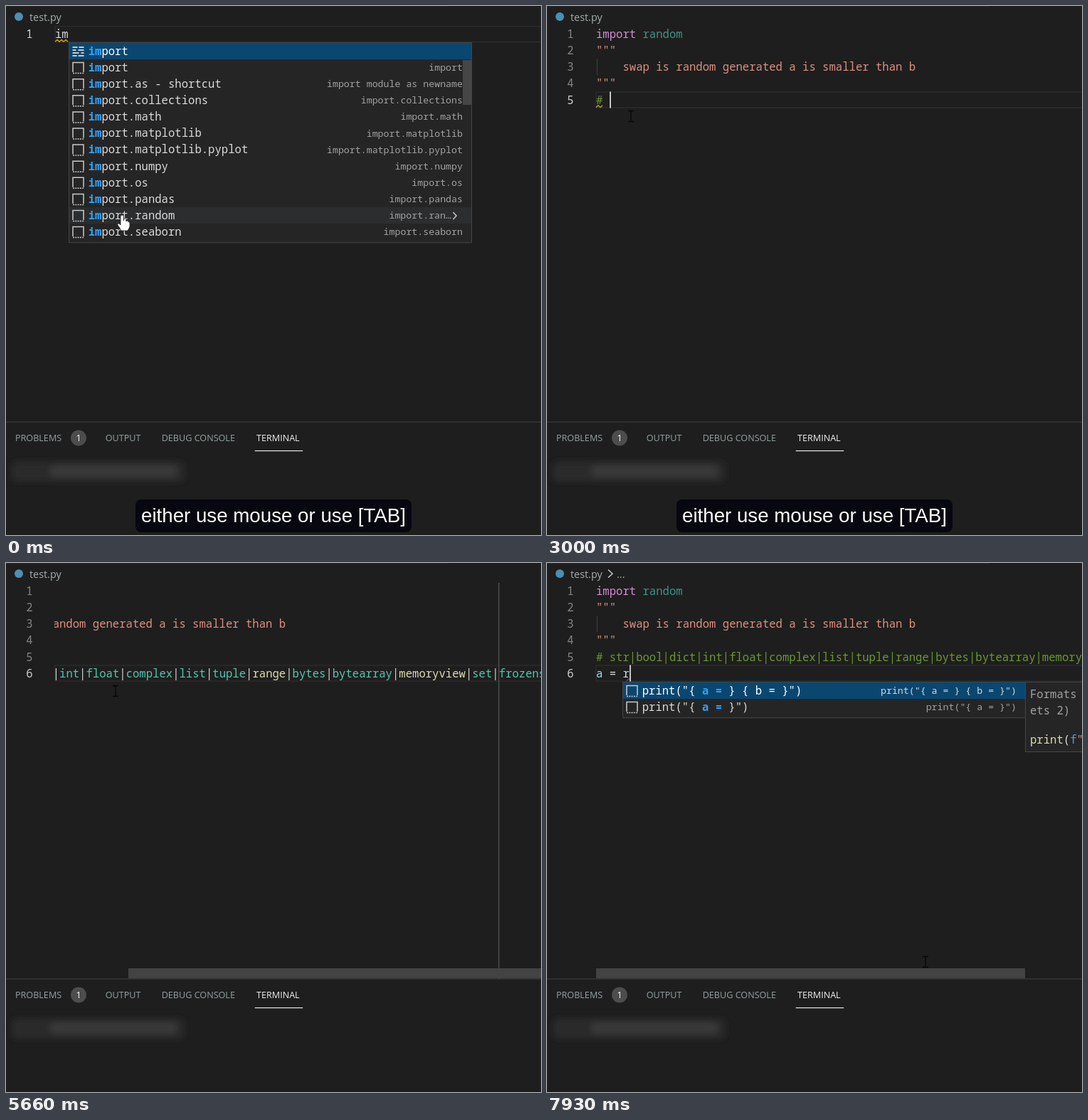
An HTML page for the animation above (8000 ms loop, 752 by 744 pixels).

```html
<!DOCTYPE html>
<html lang="en">
<head>
<meta charset="utf-8">
<title>Editor completion demo</title>
<style>
html, body { margin: 0; width: 752px; height: 744px; overflow: hidden; background: #1e1e1e; }
svg { display: block; }
text { white-space: pre; font: 15.6px "Noto Sans Mono", monospace; fill: #dadada; }
text.ui { font: 12.6px "Open Sans", sans-serif; fill: #95a0a2; }
text.file { font-size: 14.4px; fill: #a8aeae; }
text.num { text-anchor: end; fill: #858585; }
text.det { font-size: 13.28px; text-anchor: end; fill: #a2a2a2; }
text.on { fill: #fff; font-weight: 500; }
text.det.on { fill: #d3dbe2; font-weight: 400; }
text.info { fill: #a2a2a2; }
text.cap { font: 27.7px "Liberation Sans", sans-serif; fill: #fff; }
.m { fill: #2aa5ff; font-weight: 700; }
.ico { fill: none; stroke: #c9c9c9; stroke-width: 1.5; }
</style>
</head>
<body>
<svg width="752" height="744" viewBox="0 0 752 744">
  <defs>
    <clipPath id="area"><rect x="68" y="28" width="684" height="557"/></clipPath>
    <filter id="blur" x="-20%" y="-60%" width="140%" height="220%"><feGaussianBlur stdDeviation="4.5"/></filter>
    <g id="k" class="ico" style="stroke-width:1.9"><path d="M-8-6H-1M1-6H8M-8-2H-3M0-2H8M-8 2H1M4 2H8M-8 6H-2M0 6H8"/></g>
    <g id="s" class="ico"><path d="M-7.5 6V-7.5H7.5V6"/><path d="M-7.5 7.5H8" stroke-dasharray="2 1.3"/></g>
    <g id="m" class="ico" style="stroke:#b180d7"><path d="M0-8L7-4V4L0 8L-7 4V-4ZM-7-4L0 0L7-4M0 0V8"/></g>
    <g id="c" class="ico" style="stroke:#ee9d28"><path d="M-8-3L-4-7L0-3L-4 1ZM-2-1H4M1-1V5H4M4-1L6-3L8-1L6 1ZM4 5L6 3L8 5L6 7Z"/></g>
    <g id="v" class="ico" style="stroke:#75beff"><path d="M-5-5H-8V5H-5M5-5H8V5H5M-4 1L1-3L4-1V1L-1 4L-4 2ZM-4 1L-1 2L4-1M-1 2V4"/></g>
  </defs>
  <rect width="752" height="744" fill="#1e1e1e"/>
  <path d="M0 .5H622" stroke="#2c2c2c"/>
  <circle cx="18" cy="15" r="6" fill="#4a90b2"/>
  <text class="ui file" x="33" y="20.5">test.py</text>
  <g id="view"></g>
  <path d="M0 585H752" stroke="#434343"/>
  <g id="panel"></g>
  <g filter="url(#blur)">
    <rect x="8" y="641" width="242" height="28" rx="6" fill="#2a2a2a"/>
    <rect x="62" y="645" width="178" height="18" rx="8" fill="#393939"/>
  </g>
  <g id="caption">
    <rect x="182" y="694" width="388" height="46" rx="8" fill="#07070f"/>
    <text class="cap" x="190" y="726">either use mouse or use [TAB]</text>
  </g>
  <g id="mouse">
    <path id="hand" d="M0 0C2 0 2.4 1 2.4 3V8C4-1 6 7 6 9C7 7 9 8 9 10C10 9 11 10 11 12V16Q10 19 8 22H-1Q-3 18-6 14C-7 12-4 11-2 14V2Q-2 0 0 0Z" fill="#fff" stroke="#222" stroke-width=".8"/>
    <path id="beam" d="M-4-7.5H-1L0-6.5L1-7.5H4M0-6.5V6.5M-4 7.5H-1L0 6.5L1 7.5H4" fill="none" stroke="#080808" stroke-width="1.3"/>
  </g>
</svg>
<script>
const LOOP = 8000, X0 = 69, CW = 9.36, LH = 23.1, TOP = 28, POP_W = 567;
const $ = id => document.getElementById(id);
const span = (fill, s) => `<tspan fill="${fill}">${s}</tspan>`;
const rect = (x, y, w, h, fill, extra = '') =>
  `<rect x="${x}" y="${y}" width="${w}" height="${h}" fill="${fill}" ${extra}/>`;
const text = (x, y, s, cls = '') => `<text x="${x}" y="${y}" class="${cls}">${s}</text>`;

// ---- document content
const types = 'str|bool|dict|int|float|complex|list|tuple|range|bytes|bytearray|memoryview|set|frozenset';
const typed = types.split(/(\|)/).map(w =>
  span(w === '|' ? '#dadada' : /range|memoryview/.test(w) ? '#dcdcaa' : '#4ec9b0', w)).join('');
const green = s => span('#6a9a2c', s);
const salmon = s => span('#de907e', s);
const imp = span('#d48ad6', 'import') + span('#3c9586', ' random');
const quote = salmon('"""');
const doc = [imp, quote, salmon('    swap is random generated a is smaller than b'), quote];
const noted = [...doc, green('# ' + types)];

// ---- suggestion rows: icon, label (~ marks a matched letter), detail
const same = (...names) => names.map(n => `s ~i~mport.${n};import.${n}`);
const prints = mark => [
  `s print("{ ${mark} } { b = }");print("{ a = } { b = }")`,
  `s print("{ ${mark} }");print("{ a = }")`];
const rows = {
  im: ['k ~i~mport', 's ~i~mport;import', 's ~i~mport.as - shortcut;import module as newname',
    ...same('collections', 'math', 'matplotlib', 'matplotlib.pyplot', 'numpy', 'os', 'pandas', 'random', 'seaborn')],
  d: ['k ~def', 'k ~del', 'm ~delattr', 'c ~dict', 'm ~dir', 'm ~divmod', 'm ~degrees', 'm ~dist',
    's ~datatype;datatype', 's ~debug.count;debug.count', 's ~debug.init;debug.init', 's ~def.function();def.function()'],
  do: ['s ~d~ocumentation;documentation'],
  da: ['s ~d~atatype;datatype', 'm ~del~attr', 's ~del~attr;delattr', 'v ~Def~aultDict',
    's ~dict.v~alues=>1;dict.values=>1', 's ~dict.v~alues=>2;dict.values=>2', 'c ~Deprec~ationWarning',
    'v ~DynamicClass~Attribute', 's ~dict.cle~ar=>;dict.clear=>', 's ~dict.upd~ate=>;dict.update=>',
    's ~document~ation;documentation', 's .~disc~ard - set;discard'],
  dat: ['s ~d~a~tatype;datatype'],
  data: ['s ~d~a~t~atype;datatype'],
  a: ['k ~and', 'k ~as', 'k ~assert', 'k ~async', 'k ~await'],
  aSp: ['s .~add - tuple;add', ...prints('~a ='), 's .~append - list;append', 's import.~as - shortcut;import module as newname'],
  aEq: prints('~a ~=')
};
const info = {
  type: ['datatype comment', 'nippets 2)', typed],
  add: ['Adds an element', 'pets 2)', '.add(element)'],
  print: ['Formats a', 'ets 2)', span('#dcdcaa', 'print') + '(' + span('#569cd6', 'f') + span('#ce9178', '"{a')]
};

// ---- timeline: each entry changes part of the state
const warn = (line, from, to, color = '#cca700') => ({ line, from, to, color });
const list = (key, col, more) => ({ key, col, ...more });
const steps = [
  [0, { lines: ['im'], at: [1, 2], caret: 0, sq: warn(1, 0, 2), badge: 1, cap: 1, scroll: 0, bar: 0, crumb: 0,
    pop: list('im', 2, { hover: 10, thumb: [24, 87] }) }],
  [130, { caret: 1 }],
  [600, { lines: [imp], at: [1, 13], pop: null, sq: null }],
  [1000, { lines: [imp, ''], at: [2, 0], badge: 0 }],
  [1060, { lines: [imp, 'd'], at: [2, 1], pop: list('d', 1, { hover: 9 }) }],
  [1200, { lines: [imp, 'do'], at: [2, 2], pop: list('do', 1) }],
  [1330, { lines: [imp, 'doc'], at: [2, 3], badge: 1, sq: warn(2, 0, 3) }],
  [1600, { lines: [imp, quote, '', quote], at: [3, 4], pop: null, sq: null, badge: 0 }],
  [1800, { lines: doc, at: [4, 3] }],
  [1860, { lines: [...doc, ''], at: [5, 0] }],
  [2060, { lines: [...doc, 'd'], at: [5, 1], pop: list('d', 1) }],
  [2260, { lines: [...doc, 'da'], at: [5, 2], pop: list('da', 2, { thumb: [0, 147], info: 'type' }) }],
  [2460, { badge: 1, sq: warn(5, 0, 2) }],
  [2800, { lines: [...doc, ''], at: [5, 0], pop: null, sq: warn(5, 0, 1) }],
  [2930, { lines: [...doc, green('#')], at: [5, 1] }],
  [3000, { lines: [...doc, green('# ')], at: [5, 2] }],
  [3130, { sq: null, badge: 0 }],
  [3400, { lines: [...doc, green('#'), ''], at: [6, 0] }],
  [3660, { lines: [...doc, green('#'), 'd'], at: [6, 1], pop: list('d', 1) }],
  [3800, { cap: 0 }],
  [3860, { lines: [...doc, green('#'), 'da'], at: [6, 2], pop: list('da', 2, { thumb: [0, 147], info: 'type', fade: 1 }) }],
  [3930, { badge: 1, sq: warn(6, 0, 1) }],
  [4060, { lines: [...doc, green('#'), 'dat'], at: [6, 3], pop: list('dat', 2, { info: 'type', fade: 1 }) }],
  [4330, { lines: [...doc, green('#'), 'data'], at: [6, 4], pop: list('data', 2, { info: 'type', fade: 1 }) }],
  [5400, { lines: [...doc, green('#'), typed], at: [6, 89], pop: null, sq: null, scroll: 125, bar: 1 }],
  [5730, { at: [6, 0], scroll: 0, badge: 0 }],
  [5930, { lines: noted, at: [5, 2] }],
  [6130, { lines: [...noted, ''], at: [6, 0] }],
  [6530, { lines: [...noted, 'a'], at: [6, 1], pop: list('a', 1) }],
  [6730, { badge: 1, sq: warn(6, 0, 1) }],
  [6800, { lines: [...noted, 'a '], at: [6, 2], pop: list('aSp', 2, { info: 'add' }) }],
  [7000, { lines: [...noted, 'a ='], at: [6, 3], pop: null }],
  [7330, { lines: [...noted, span('#9cdcfe', 'a') + ' = '], at: [6, 4], pop: list('aEq', 4), sq: null }],
  [7400, { pop: list('aEq', 4, { info: 'print' }) }],
  [7600, { caret: 0 }],
  [7730, { crumb: 1 }],
  [7930, { lines: [...noted, span('#9cdcfe', 'a') + ' = ' + span('#b9dcf0', 'r')], at: [6, 5], caret: 1, sq: warn(6, 4.6, 5.4, '#c0392f') }]
];

// mouse path: time, x, y
const path = [[0, 163, 294], [60, 163, 294], [260, 141, 297], [800, 141, 297], [860, 136, 291], [2060, 136, 291],
  [2800, 118, 155], [3660, 118, 155], [4060, 121, 155], [5130, 121, 155], [5260, 152, 190], [5390, 152, 190],
  [5400, 154, 180], [6129, 154, 180], [6130, 532, 561], [LOOP, 532, 561]];

// ---- drawing
function squiggle({ line, from, to, color }) {
  const end = X0 + to * CW, y = TOP + line * LH - 2.3;
  let d = '', up = 0;
  for (let x = X0 + from * CW; x <= end; x += 3) d += `${d ? 'L' : 'M'}${x} ${y + (up ^= 1) * 3 - 1.5}`;
  return `<path d="${d}" fill="none" stroke="${color}" stroke-width="1.3"/>`;
}

function code(s) {
  const [line, col] = s.at, y = TOP + (line - 1) * LH;
  let out = rect(X0, y + .5, 900, LH - 1, 'none', 'stroke="#2b2b2b" stroke-width="1.5"');
  if (s.lines.length > 2) out += rect(X0 + 1 - s.scroll, TOP + 2 * LH, 1, LH, '#424242');
  let body = s.lines.map((l, i) => text(X0, TOP + (i + 1) * LH - 6, l)).join('');
  if (s.sq) body += squiggle(s.sq);
  if (s.caret) body += rect(Math.round(X0 + col * CW), y, 2, LH, '#c4c5c3');
  body += rect(X0 + 80 * CW - .5, TOP, 1, 557, '#606060');
  out += `<g transform="translate(${-s.scroll})">${body}</g>`;
  if (s.bar) out += rect(X0 + s.scroll * .824, 570, 603, 14, '#434343');
  const nums = s.lines.map((_, i) =>
    `<text class="num" x="37.6" y="${TOP + (i + 1) * LH - 6}" ${
      i + 1 === line ? 'style="fill:#d0d0d0"' : ''}>${i + 1}</text>`).join('');
  return `<g clip-path="url(#area)">${out}</g>${nums}`;
}

function popup(s) {
  const p = s.pop, items = rows[p.key];
  const x = Math.round(X0 + p.col * CW) + 1, y = Math.round(TOP + s.at[0] * LH) + 1;
  let out = rect(x - .5, y - .5, POP_W - 1, items.length * LH + 4, '#252526', 'stroke="#454545"');
  items.forEach((item, i) => {
    const [label, detail] = item.slice(2).split(';'), ry = y + i * LH, cls = i ? '' : 'on';
    if (!i) out += rect(x, ry, POP_W - 2, LH, '#094771');
    if (i && i === p.hover) out += rect(x, ry, POP_W - 2, LH, '#2b2d2f');
    out += `<use href="#${item[0]}" x="${x + 12.5}" y="${ry + 12}"/>`;
    out += text(x + 26.7, ry + 16.8, label.replace(/~(.)/g, '<tspan class="m">$1</tspan>'), cls);
    if (!detail) return;
    const cut = i === p.hover;
    out += text(x + (cut ? 537 : 553), ry + 16, cut ? detail.slice(0, p.key === 'd' ? 8 : 10) + '…' : detail, 'det ' + cls);
    if (cut) out += `<path class="ico" d="M${x + 539.5} ${ry + 7}l4.5 5l-4.5 5"/>`;
  });
  if (p.thumb) out += rect(x + 553, y + p.thumb[0], 12, p.thumb[1] - p.thumb[0], '#797979', 'opacity=".4"');
  if (p.info) {
    const ix = x + POP_W - 1.5, t = info[p.info];
    out += rect(ix, y - .5, 200, 98, '#252526', 'stroke="#454545"');
    [16.6, 39.7, 81.5].forEach((dy, i) => out += text(ix + 6.5, y + dy + (i < 2 ? 5 : 4.5), t[i], i < 2 ? 'info' : ''));
    if (p.fade) out += rect(ix, y + 85, 200, 12, '#797979', 'id="fade"');
  }
  return out;
}

function panel(s) {
  const dx = s.badge ? 31.7 : 0;
  let out = text(13, 612, 'PROBLEMS', 'ui');
  if (s.badge) out += '<circle cx="102" cy="607.5" r="11" fill="#4d4d4d"/>' +
    '<text class="ui" x="102" y="612" text-anchor="middle" style="fill:#fff">1</text>';
  out += text(108 + dx, 612, 'OUTPUT', 'ui') + text(187 + dx, 612, 'DEBUG CONSOLE', 'ui');
  out += `<text class="ui" x="${320.3 + dx}" y="612" style="fill:#f0f0f0">TERMINAL</text>`;
  return out + rect(318 + dx, 625, 67.5, 1.2, '#e7e7e7');
}

const crumb = '<path class="ico" d="M86 9.5l6 5.5l-6 5.5"/>' + text(98, 20.5, '...', 'ui file');

let shown = -1;
function frame() {
  const t = performance.now() % LOOP;
  const n = steps.filter(k => k[0] <= t).length;
  if (n !== shown) {
    shown = n;
    const s = Object.assign({}, ...steps.slice(0, n).map(k => k[1]));
    $('view').innerHTML = code(s) + (s.pop ? popup(s) : '') + (s.crumb ? crumb : '');
    $('panel').innerHTML = panel(s);
    $('caption').style.display = s.cap ? '' : 'none';
  }
  const fade = $('fade');
  if (fade) fade.setAttribute('opacity', .4 * Math.min(1, Math.max(0, (5130 - t) / 800)));

  const i = path.findIndex(p => p[0] > t), [t0, x0, y0] = path[i - 1], [t1, x1, y1] = path[i];
  const f = (t - t0) / (t1 - t0);
  $('mouse').setAttribute('transform', `translate(${x0 + (x1 - x0) * f} ${y0 + (y1 - y0) * f})`);
  const hand = t < 600 || (t > 5190 && t < 5400);
  $('hand').style.display = hand ? '' : 'none';
  $('beam').style.display = hand ? 'none' : '';
  requestAnimationFrame(frame);
}
frame();
</script>
</body>
</html>
```
